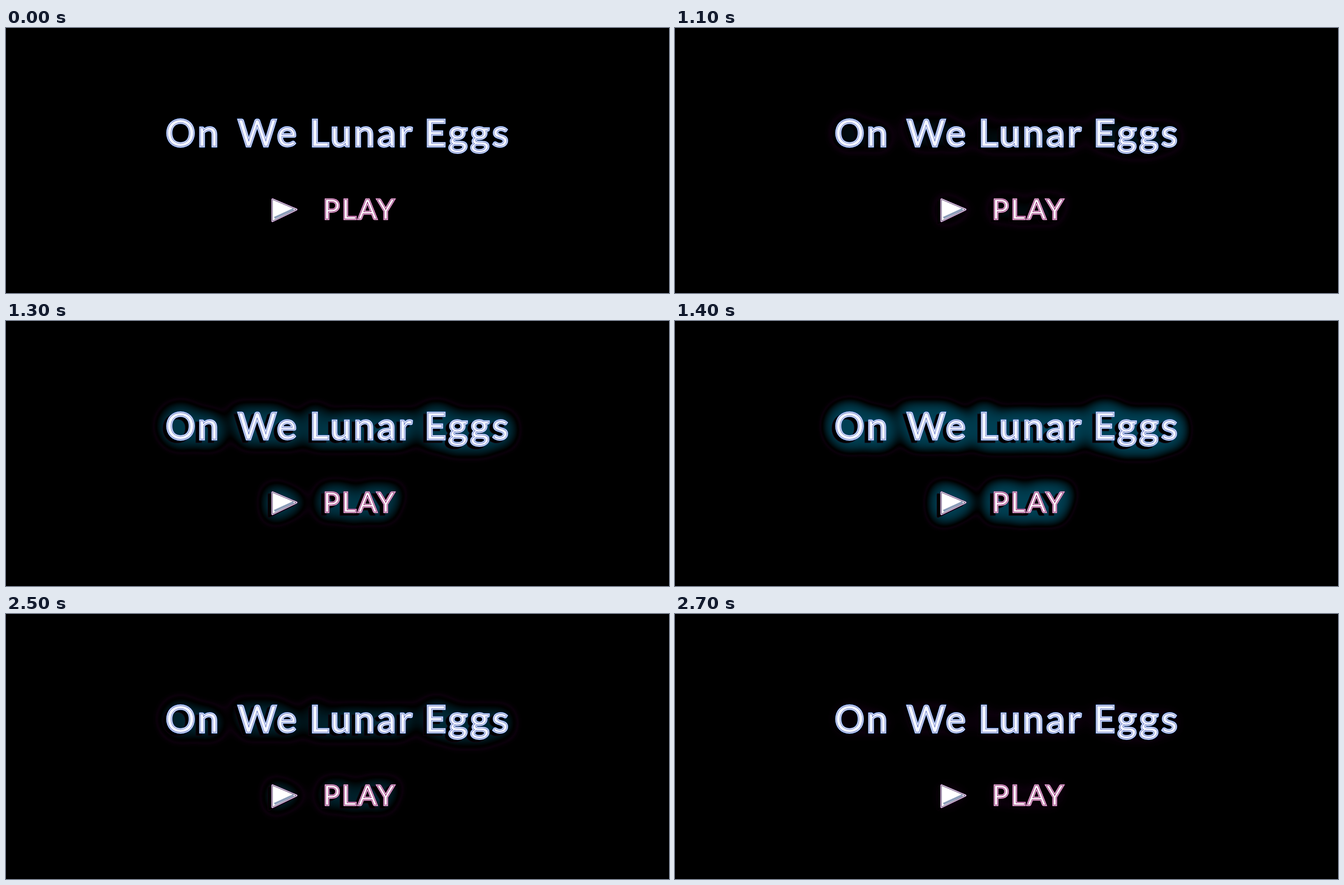
Recreate the animation shown at these times as an HTML page. Size 1183 by 473 pixels, loop 2800 ms.

```html
<!DOCTYPE html>
<html lang="en">
<head>
<meta charset="utf-8">
<title>Neon title</title>
<style>
  html, body { margin: 0; width: 100%; height: 100%; overflow: hidden; background: #000; }
  svg { display: block; width: 100%; height: 100%; }
  text { font-family: Lato, sans-serif; }
  #title { font-size: 66px; letter-spacing: 5px; }
  #play { font-size: 49px; letter-spacing: 4px; }
  #arrow { stroke-linejoin: round; }
</style>
</head>
<body>
<svg viewBox="0 0 1183 473">
  <defs>
    <g id="title">
      <text x="285" y="210.5">On</text>
      <text x="414" y="210.5">We</text>
      <text x="542" y="210.5">Lunar</text>
      <text x="747" y="210.5">Eggs</text>
    </g>
    <text id="play" x="566" y="341">PLAY</text>
    <path id="arrow" d="M475.5 306L518 324L475.5 344.5Z"/>
    <g id="all">
      <use href="#title"/><use href="#play"/><use href="#arrow"/>
    </g>
    <!-- Blurred coverage mapped to a teal core, a black gap and a faint purple rim -->
    <filter id="halo" filterUnits="userSpaceOnUse" x="0" y="0" width="1183" height="473"
            color-interpolation-filters="sRGB">
      <feGaussianBlur stdDeviation="15"/>
      <feColorMatrix id="gain"/>
      <feComponentTransfer>
        <feFuncR id="red" type="table"/>
        <feFuncG id="green" type="table"/>
        <feFuncB id="blue" type="table"/>
      </feComponentTransfer>
    </filter>
  </defs>

  <use href="#all" stroke="#fff" stroke-width="18" stroke-linejoin="round" filter="url(#halo)"/>

  <g id="shadow" transform="translate(-6 4)">
    <use href="#all" stroke="#14000f" stroke-width="5" fill="#14000f"/>
    <use href="#all" stroke="#000" stroke-width="3"/>
  </g>

  <g fill="none">
    <use href="#title" stroke="#2a62c8" stroke-width="4.8"/>
    <use href="#title" stroke="#fff" stroke-width="3.4"/>
    <use href="#title" stroke="#5a6cc4" stroke-width=".9" fill="#f4f7ff"/>

    <use href="#play" stroke="#8c1a70" stroke-width="4"/>
    <use href="#play" stroke="#fff" stroke-width="2.8"/>
    <use href="#play" stroke="#8a1868" stroke-width="1" fill="#fff"/>

    <use href="#arrow" stroke="#6a2a78" stroke-width="4.4"/>
    <use href="#arrow" stroke="#fff" stroke-width="3" fill="#fff"/>
    <path d="M479 339L513 323.5" stroke="#8a9cb8" stroke-width="4"/>
    <use href="#arrow" stroke="#4a2a60" stroke-width=".9"/>
  </g>
</svg>
<script>
  const LOOP = 2800, STEP = 100, RISE = 1000, FALL = 2400, STEPS = 5, TONES = 50;
  const byId = id => document.getElementById(id);

  // Tone curves over the glow strength v, from 0 to 1
  const rim = v => 0.045 * Math.max(0, 1 - Math.abs(v - 0.06) / 0.03);
  const core = v => 1 - Math.exp(-5 * Math.max(0, v - 0.1));

  function setCurve(id, curve) {
    const values = Array.from({ length: TONES + 1 }, (_, i) => curve(i / TONES).toFixed(3));
    byId(id).setAttribute('tableValues', values.join(' '));
  }
  setCurve('red', rim);
  setCurve('green', v => 0.26 * core(v));
  setCurve('blue', v => rim(v) + 0.34 * core(v));

  function levelAt(t) {
    const up = Math.floor((t - RISE) / STEP) + 1;
    const down = STEPS - 1 - Math.floor((t - FALL) / STEP);
    const step = Math.min(up, down, STEPS);
    return step > 0 ? 1.8 ** (step - STEPS) : 0;
  }

  let shown = -1;
  function frame() {
    const level = levelAt(performance.now() % LOOP);
    if (level !== shown) {
      const row = `0 0 0 ${level} 0 `;
      byId('gain').setAttribute('values', row.repeat(3) + '0 0 0 0 1');
      byId('shadow').setAttribute('opacity', Math.min(1, level * 4));
      shown = level;
    }
    requestAnimationFrame(frame);
  }
  frame();
</script>
</body>
</html>
```
